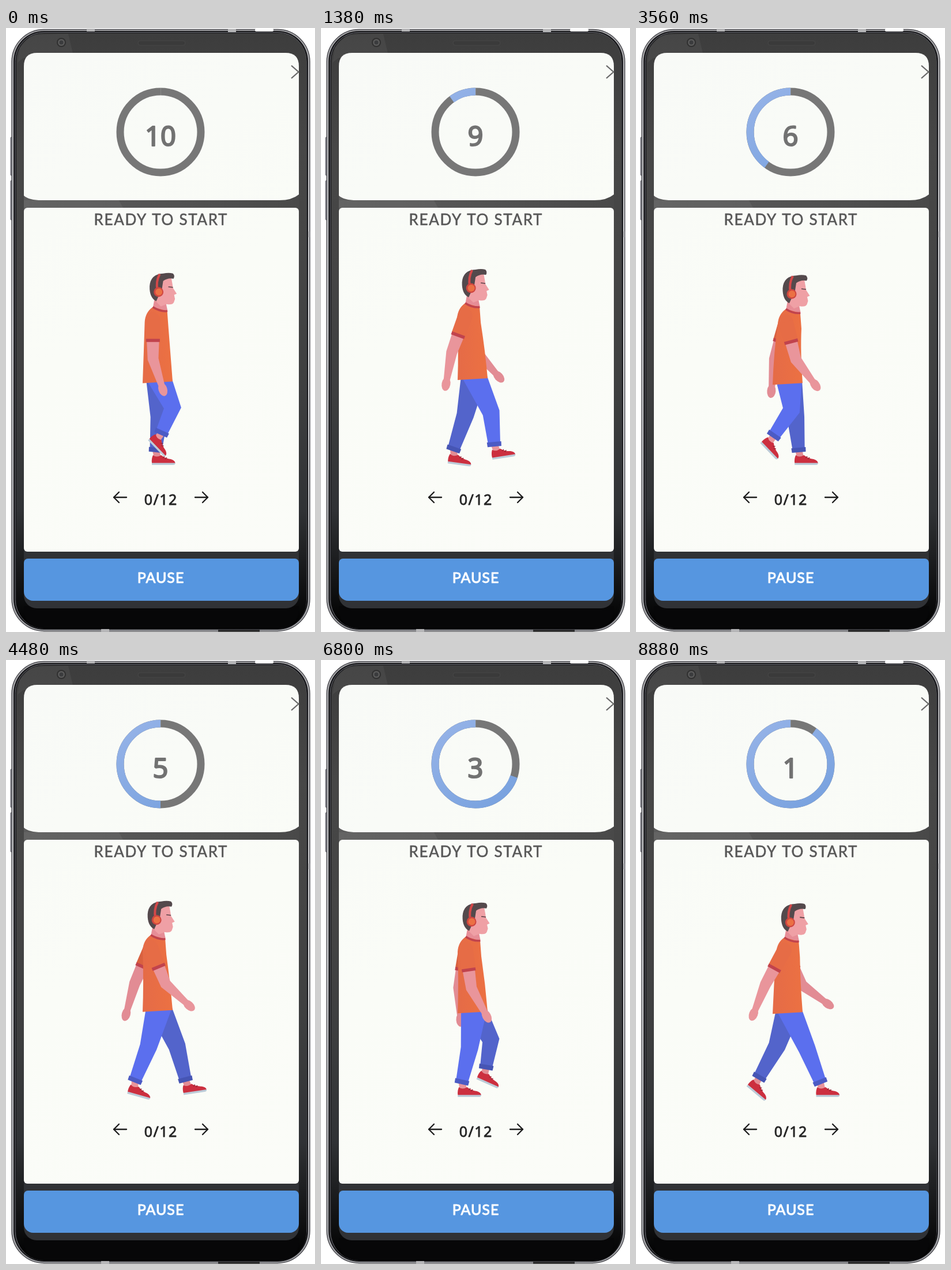
Animation of 536x1045 px, one loop 8900 ms. Source, as an HTML page with a canvas:

```html
<!DOCTYPE html>
<html lang="en">
<head>
<meta charset="utf-8">
<title>Workout timer</title>
<style>
html, body { margin: 0; width: 100%; height: 100%; overflow: hidden; background: #fff; }
canvas { display: block; width: 536px; height: 1045px; }
</style>
</head>
<body>
<canvas id="stage" width="536" height="1045"></canvas>
<script>
const LOOP = 8900, STRIDE = 1222.5, START_PHASE = 0.757;
const TAU = Math.PI * 2, DEG = Math.PI / 180;
const stage = document.getElementById('stage');
let ctx = stage.getContext('2d');

const NEAR = { pants: '#5b6fee', cuff: '#4c5bc4', skin: '#e9959b', shirt: '#e66c46' };
const FAR = { pants: '#5364cb', cuff: '#4655b4', skin: '#e28c94', shirt: '#d9613f' };
const RED = '#c1434d';

const mix = (a, b, k) => a + (b - a) * k;
const ramp = (v, a, b) => {
  const k = Math.min(1, Math.max(0, (v - a) / (b - a)));
  return k * k * (3 - 2 * k);
};
const along = ([x, y], angle, d) => [x + Math.sin(angle) * d, y + Math.cos(angle) * d];
const heading = ([x0, y0], [x1, y1]) => Math.atan2(x1 - x0, y1 - y0);
const turn = ([x, y], a) => [x * Math.cos(a) - y * Math.sin(a), x * Math.sin(a) + y * Math.cos(a)];
const add = ([a, b], [c, d]) => [a + c, b + d];

function box(x, y, w, h, r, fill, stroke, width = 1) {
  ctx.beginPath();
  ctx.roundRect(x, y, w, h, r);
  if (fill) { ctx.fillStyle = fill; ctx.fill(); }
  if (stroke) { ctx.strokeStyle = stroke; ctx.lineWidth = width; ctx.stroke(); }
}

function shade(x0, y0, x1, y1, ...colors) {
  const g = ctx.createLinearGradient(x0, y0, x1, y1);
  colors.forEach((c, i) => g.addColorStop(i / (colors.length - 1), c));
  return g;
}

function poly(points, fill) {
  ctx.beginPath();
  points.forEach(p => ctx.lineTo(...p));
  ctx.closePath();
  ctx.fillStyle = fill;
  ctx.fill();
}

function line(points, color, width, cap = 'butt') {
  ctx.beginPath();
  points.forEach(p => ctx.lineTo(...p));
  ctx.strokeStyle = color;
  ctx.lineWidth = width;
  ctx.lineCap = cap;
  ctx.lineJoin = 'round';
  ctx.stroke();
}

function shape(path, fill, stroke, width) {
  const p = new Path2D(path);
  if (fill) { ctx.fillStyle = fill; ctx.fill(p); }
  if (stroke) { ctx.strokeStyle = stroke; ctx.lineWidth = width; ctx.stroke(p); }
}

function dot(x, y, r, fill) {
  ctx.beginPath();
  ctx.arc(x, y, r, 0, TAU);
  ctx.fillStyle = fill;
  ctx.fill();
}

function ring(color, turns) {
  const top = -TAU / 4;
  ctx.beginPath();
  ctx.arc(268, 180, 70, top, top - TAU * turns, true);
  ctx.strokeStyle = color;
  ctx.lineWidth = 13;
  ctx.lineCap = 'butt';
  ctx.stroke();
}

// A thin round outline softens the letter ends
function label(str, x, y, font, color, spacing, outline) {
  ctx.font = font;
  ctx.letterSpacing = spacing + 'px';
  ctx.textAlign = 'center';
  ctx.fillStyle = ctx.strokeStyle = color;
  ctx.lineWidth = outline;
  ctx.lineJoin = 'round';
  ctx.fillText(str, x + spacing / 2, y);
  ctx.strokeText(str, x + spacing / 2, y);
}

function arrow(x, dir) {
  line([[x - 11 * dir, 812], [x + 11 * dir, 812]], '#1d1d1d', 2.3, 'round');
  line([[x + 2 * dir, 803], [x + 11 * dir, 812], [x + 2 * dir, 821]], '#1d1d1d', 2.3, 'round');
}

function drawPhone() {
  ctx.fillStyle = '#fff';
  ctx.fillRect(0, 0, 536, 1045);
  box(8, 189, 3, 66, 1, '#9a9ba4', '#5c5d64');
  box(8, 264, 3, 68, 1, '#9a9ba4', '#5c5d64');

  // Metal rim and glass
  box(10, 2.5, 517, 1041, 56, shade(0, 0, 0, 1045, '#a8a8ab', '#dcdde0', '#a4a5a9'), '#48484d', 1.4);
  box(13, 5, 511, 1036, 53, '#17171a');
  box(16, 7.5, 505, 1031, 50, null, '#6d6e74', 1);
  box(18, 9, 503, 1030, 48, shade(0, 9, 0, 1040, '#3d3d3d', '#474747', '#454545', '#3e3f40', '#303235', '#000'));
  for (const [x, y] of [[140, 1], [385, 2], [165, 1040]]) box(x, y, 14, 5, 0, '#b5b5b7');
  box(432, 1, 32, 5, 2, '#fff');
  line([[526, 352], [526, 362]], '#99999d', 2);
  line([[368, 1043], [440, 1043]], '#161616', 3);

  // Glare, camera and earpiece
  poly([[20, 60], [24, 34], [44, 12], [108, 10], [116, 44], [30, 52]], '#ffffff0c');
  dot(96, 25, 8, '#303030');
  dot(96, 25, 6, '#5a5a5a');
  dot(96, 25, 3.5, '#3a3b3d');
  box(229, 22, 82, 8, 4, '#3a3a3a', '#474747');

  // Display panels
  box(31, 1000, 477, 38, [0, 0, 30, 30], '#070708');
  box(31, 900, 477, 104, [0, 0, 22, 22], '#303236');
  box(31, 290, 477, 30, 0, shade(31, 0, 508, 0, '#5c5c5c', '#535353', '#494949'));
  poly([[31, 298], [196, 298], [203, 311], [31, 311]], '#ffffff0d');
  const white = shade(31, 43, 508, 906, '#f8faf7', '#fafcf7', '#fbfcf8');
  shape('M31 66Q31 43 54 43H485Q508 43 508 66V288Q496 298 474 298H62Q40 298 31 290Z', white);
  box(31, 311, 477, 595, 6, white);
  box(31, 918, 477, 73, [7, 7, 16, 16], '#5696e0');
  line([[495, 65], [507.5, 76], [495, 87]], '#686868', 2.3);

  label('READY TO START', 268, 340.5, '400 26px Lato, sans-serif', '#585858', 1.7, .6);
  label('0/12', 268, 825, '400 25px "Noto Sans", sans-serif', '#252525', 1.4, .8);
  label('PAUSE', 268, 960, '400 25px Lato, sans-serif', '#fff', 1, 1);
  arrow(198, -1);
  arrow(339, 1);
}

function drawTimer(t) {
  const gone = Math.floor((t + 610) / 1000);
  ring('#777', 1);
  if (gone) ring(shade(210, 120, 310, 250, '#94b2e7', '#79a2df'), gone / 10);
  label(String(10 - gone), 268, 203.5, '400 47px "Noto Sans", sans-serif', '#727272', 0, 2.2);
}

// Both edges of a tapering limb: each joint is a point, half width and direction
function limb(fill, ...joints) {
  const side = s => joints.map(([[x, y], w, a]) => [x + s * w * Math.cos(a), y - s * w * Math.sin(a)]);
  poly([...side(-1), ...side(1).reverse()], fill);
}

function drawShoe([x, y], tilt) {
  ctx.save();
  ctx.translate(x, y);
  ctx.rotate(tilt);
  shape('M-20 4H20.5V6Q20 8 17 8H-20Z', '#bccbd8');
  shape('M-20 4.5Q-21 -3 -18 -9Q-12 -4 -4 -9Q4 -3 13 -2Q20 0 20.5 4.5Z', '#cc2f3f');
  line([[-1, -4], [2, -7]], '#8e2635', 1.2);
  line([[3, -2], [6, -5]], '#8e2635', 1.2);
  ctx.restore();
}

// The foot slides back on the ground for half a stride, then swings forward
function drawLeg(phase, hem, tone) {
  const p = phase % 1, air = Math.max(0, p - .4) / .6;
  const lift = 26 * Math.sin(Math.PI * air ** 1.3) ** 2;
  const swing = Math.max(0, 2 * p - 1) ** 1.2;
  const x = p < .5 ? mix(338, 212, 2 * p) : mix(212, 338, ramp(swing, 0, 1));
  const tilt = DEG * (46 * ramp(p, .32, .58) - 56 * ramp(p, .76, .9) + 10 * ramp(p, .9, 1));

  const shoe = [x, 748 - lift], hip = [265.5, hem - 6];
  const ankle = add(shoe, turn([-13, -18], tilt));
  const knee = [mix(hip[0], ankle[0], .52) + 3 + .7 * lift, mix(hip[1], ankle[1], .54)];
  const shin = heading(knee, ankle);
  line([ankle, add(shoe, turn([-10, -4], tilt))], tone.skin, 12);
  drawShoe(shoe, tilt);
  limb(tone.pants, [hip, 22.5, 0], [knee, 15, heading(hip, ankle)], [ankle, 10.5, shin]);
  limb(tone.cuff, [along(ankle, shin, -4), 12.5, shin], [along(ankle, shin, 4), 12, shin]);
}

function drawArm(phase, shoulder, tone) {
  const swing = Math.cos(TAU * phase - .1);
  const u = DEG * (-1 - 28 * swing), l = DEG * (16 - 38 * swing);
  const elbow = along(shoulder, u, 68), hand = along(elbow, l, 55);
  limb(tone.skin, [along(shoulder, u, 30), 11, u], [elbow, 9.5, (u + l) / 2], [along(elbow, l, 47), 5.5, l]);
  ctx.beginPath();
  ctx.ellipse(...hand, 7.5, 12, -l, 0, TAU);
  ctx.fill();
  dot(...shoulder, 12.5, tone.shirt);
  limb(tone.shirt, [shoulder, 12.5, u], [along(shoulder, u, 35), 12, u]);
  limb(RED, [along(shoulder, u, 33), 12, u], [along(shoulder, u, 38.5), 12, u]);
}

function drawHead(x, y) {
  ctx.save();
  ctx.translate(x, y);
  shape('M-7 12L-10 28L4 35L16 34L13 20Z', '#e68d96');
  shape('M0 -22L22 -25L24 -14L25 -7L31.5 3L27 5L28.5 12L26.5 18Q24 23 14 21L4 25L-7 14Z', '#efa0a5');
  shape('M25 -32Q29 -28 26 -23Q16 -25 8 -19L6 -6L-4 16Q-16 10 -15.5 -10Q-14 -31 8 -32Q18 -34 25 -32Z', '#54494c');
  line([[17, -9], [25, -8]], '#5a4248', 1.6);
  shape('M2 -31Q-5 -18 -2 -3', null, '#d44849', 4);
  dot(0, 0, 8.5, '#cf4640');
  dot(0.5, 0, 6, '#eb7044');
  ctx.restore();
}

function drawWalker(t) {
  const phase = START_PHASE + t / STRIDE;
  const sway = Math.cos(2 * TAU * (phase - .12)), bob = Math.cos(2 * TAU * (phase - .16));
  const x = 265.5 + 5.5 * sway, y = 455 + 5.3 * bob, hem = 612 + 4.3 * bob;
  const shoulder = [x - 10, y + 48];
  drawArm(phase + .5, shoulder, FAR);
  drawLeg(phase + .5, hem, FAR);
  drawLeg(phase, hem, NEAR);
  drawHead(x, y);
  shape(`M${x - 10} ${y + 26}Q${x - 23} ${y + 35} ${x - 24} ${y + 52}Q239 560 237 ${hem + 1}
    L289 ${hem - 2}Q285 560 ${x + 17} ${y + 60}L${x + 15} ${y + 33}Z`,
    shade(238, 0, 290, 0, '#e56b47', '#ec7142'));
  shape(`M${x - 10} ${y + 26}Q${x + 2} ${y + 34} ${x + 15} ${y + 33}`, null, RED, 3.5);
  drawArm(phase, shoulder, NEAR);
}

const screen = ctx;
const phone = document.createElement('canvas');
phone.width = stage.width;
phone.height = stage.height;
ctx = phone.getContext('2d');
drawPhone();
ctx = screen;

const begin = performance.now();
function frame() {
  const t = (performance.now() - begin) % LOOP;
  ctx.drawImage(phone, 0, 0);
  drawTimer(t);
  drawWalker(t);
  requestAnimationFrame(frame);
}
frame();
</script>
</body>
</html>
```
